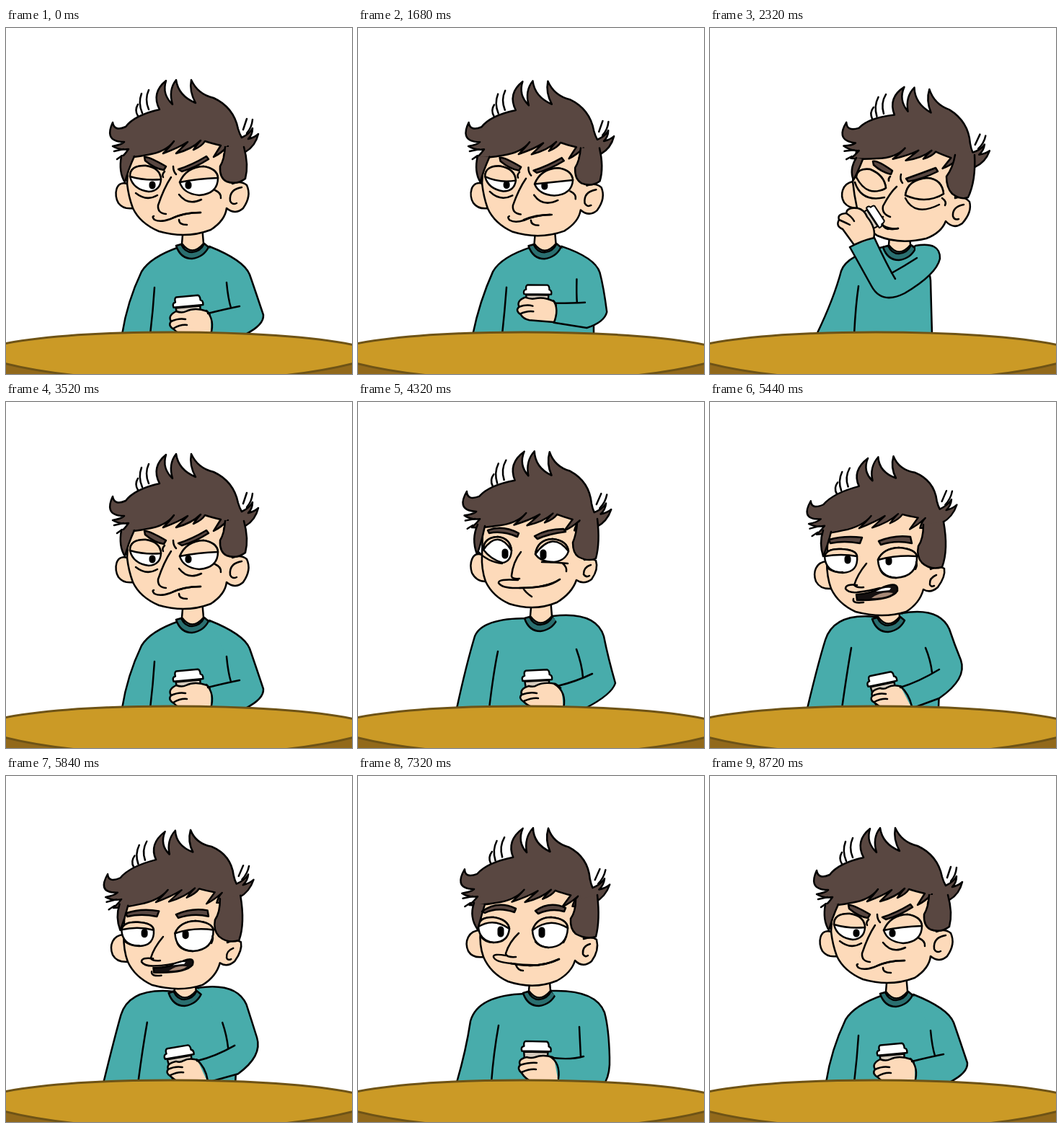
Animation, 480 px wide and 480 px high, one loop 8760 ms. Source, as an HTML page:

```html
<!DOCTYPE html>
<html lang="en">
<head>
<meta charset="utf-8">
<title>Coffee break</title>
<style>
html, body { margin: 0; height: 100%; overflow: hidden; background: #fff; }
svg { display: block; width: 100%; height: 100%; }
path { fill: none; stroke: #000; stroke-width: 2.5; stroke-linecap: round; stroke-linejoin: round; }
.skin { fill: #fddaba; }
.hair { fill: #594741; }
.shirt { fill: #48acab; }
.collar { fill: #2a6f70; }
.white { fill: #fff; }
.paper { fill: #d6cbbd; }
.dark { fill: #141010; }
.tongue { fill: #a88a78; }
.rim { fill: #92691b; }
.table { fill: #cb9a26; stroke: #6e5316; stroke-width: 3; }
.plain { stroke: none; }
.pupil { stroke-width: 9; }
</style>
</head>
<body>
<svg viewBox="0 0 480 480">
  <path id="body" class="shirt"/>
  <path id="sleeve"/>
  <g id="neck">
    <path class="skin" d="M246 275L244 299Q258 318 274 299L272 275"/>
    <path class="collar" d="M236 302Q242 320 258 320Q274 318 281 304L275 299Q270 310 258 311Q248 311 243 300Z"/>
  </g>
  <path id="head" class="skin"/>
  <path id="faceLines"/>
  <path id="eyeL" class="white"/>
  <path id="eyeR" class="white"/>
  <path id="pupils" class="pupil"/>
  <path id="coverL" class="skin"/>
  <path id="coverR" class="skin"/>
  <path id="bags"/>
  <path id="nose"/>
  <path id="open" class="dark"/>
  <path id="teeth" class="white plain"/>
  <path id="tongue" class="tongue plain"/>
  <path id="mouth"/>
  <path id="frown"/>
  <g id="hair"><g transform="translate(-248.5 -139.5)">
    <path class="hair" d="M148 131Q150 144 166 137Q178 121 213 113Q201 90 222 73Q216 92 231 106Q225 86 236 72Q239 94 263 104Q254 88 257 72Q266 92 288 97Q316 110 322 140Q324 147 327 152Q338 147 342 139Q342 148 336 154Q345 152 350 147Q346 164 332 172L330 180L302 178Q303 170 308 164Q298 174 288 179Q296 166 298 163Q285 160 276 157Q272 164 260 169Q266 160 270 156Q258 168 236 174Q246 164 252 158Q240 166 218 174Q228 164 233 157Q222 172 196 176Q176 180 160 180Q166 174 170 168Q158 170 148 164Q160 162 164 158C140 158 142 144 148 131Z"/>
    <path d="M183 122Q178 114 183 106M189 118Q183 104 188 91M198 113Q192 99 198 86M329 141L334 126M334 146Q341 138 342 127M163 168L150 171M161 177L154 182"/>
  </g></g>
  <path id="sideL" class="hair"/>
  <path id="sideR" class="hair"/>
  <path id="browL" class="hair"/>
  <path id="browR" class="hair"/>
  <g id="cup">
    <path class="paper" d="M-17 6L-14 40H14L17 6Z"/>
    <path class="white" d="M-15 -9H15Q18 -8 18 -2Q22 -1 21 5H-20Q-22 -1 -17 -2Q-18 -8 -15 -9Z"/>
  </g>
  <path id="hand" class="skin"/>
  <path id="fingers"/>
  <path id="armFill" class="shirt plain"/>
  <path id="arm"/>
  <path id="folds"/>
  <path class="rim plain" d="M-2 445H482V482H-2Z"/>
  <path class="table" d="M-3 438C60 426 140 422 230 422C330 422 430 428 483 440V465Q440 476 385 482H98Q40 476 -3 465Z"/>
</svg>
<script>
// Every pose uses the same path structure, so any two can be blended number by number.
const noTeeth = 'M238 259Q238 259 238 259L238 259Q238 259 238 259Z';
const noTongue = 'M236 260Q236 260 236 260Q236 260 236 260Z';
const noFrown = 'M252 187Q252 187 252 187M218 186Q218 186 218 186';

function pose(p) {
  p = { teeth: noTeeth, tongue: noTongue, frown: noFrown, ...p };
  p.eyeL = p.topL + p.lowL;
  p.eyeR = p.topR + p.lowR;
  p.coverL = p.topL + p.lidL;
  p.coverR = p.topR + p.lidR;
  p.armFill = p.arm + p.bend + 'Z';
  return p;
}

const grumpy = pose({
  body: 'M161 425Q168 380 188 338Q200 318 240 304L280 303Q325 325 330 360L330 425',
  sleeve: 'M206 360Q204 392 200 425',
  neck: 'translate(0 0)',
  head: 'M172 150L168 216C152 211 149 232 156 243Q163 252 176 250Q186 271 212 282Q250 293 284 280Q304 267 306 250Q318 260 329 250Q341 233 334 218Q326 211 314 216L318 150Z',
  faceLines: 'M168 216Q170 234 176 250M327 221Q309 224 311 240Q314 246 320 243',
  topL: 'M172 206Q172 190 194 191Q214 194 215 210',
  lowL: 'Q214 226 198 227Q176 224 172 206Z',
  lidL: 'Q192 212 172 206Z',
  topR: 'M241 214Q250 193 274 192Q293 195 294 208',
  lowR: 'Q294 230 268 232Q246 230 241 214Z',
  lidR: 'Q266 209 241 214Z',
  pupils: 'M203 217L203 219M253 217L253 219',
  bags: 'M180 229Q195 241 210 232M240 231Q252 247 271 238M290 225Q299 229 298 236',
  nose: 'M229 207Q219 222 211 246Q210 257 222 258',
  open: 'M228 265Q246 256 270 256Q262 256 254 257Q240 259 228 265Z',
  mouth: 'M205 261Q202 262 206 266Q214 270 228 265Q246 256 270 256M240 266Q240 273 251 273',
  frown: 'M232 192Q232 199 236 203M220 199Q216 203 218 207',
  hair: 'matrix(1 0 0 1 248.5 139.5)',
  sideL: 'M160 178Q156 200 165 214Q169 198 178 178',
  sideR: 'M304 165Q303 182 297 192Q296 208 306 213Q320 218 332 209Q337 190 330 165',
  browL: 'M192 179Q198 178 222 192L219 197Q206 195 193 184Z',
  browR: 'M239 196Q258 190 278 178L281 182Q262 194 244 199Z',
  cup: 'matrix(.995 -.09 .09 .995 252 381)',
  hand: 'M236 393Q224 399 229 407Q224 413 233 418Q238 424 246 425L286 425Q290 404 279 393Q262 387 250 393Q244 396 236 393Z',
  fingers: 'M229 407Q240 402 249 404M232 417Q242 411 251 412',
  arm: 'M282 303Q330 322 338 342Q345 362 357 398Q358 412 332 425L284 425',
  bend: 'L284 397L324 387L306 353',
  folds: 'M306 353Q308 375 312 388M324 386Q304 390 280 396M278 392Q290 405 284 425'
});

const drink = pose({
  body: 'M148 425Q172 375 182 337Q190 314 244 303L285 303Q304 330 306 350L308 425',
  sleeve: 'M206 358Q202 385 200 425',
  neck: 'translate(4 2)',
  head: 'M205 155L198 213C183 216 180 232 186 242Q192 250 204 250Q212 275 232 288Q262 301 300 292Q321 284 327 268Q338 280 350 271Q364 255 360 241Q352 232 340 236L350 165Z',
  faceLines: 'M198 213Q200 232 204 250M352 245Q336 248 337 261Q339 267 345 265',
  topL: 'M203 207Q204 194 222 196Q242 204 244 222',
  lowL: 'Q236 228 224 224Q210 218 203 207Z',
  lidL: 'Q218 236 203 207Z',
  topR: 'M271 232Q274 210 302 208Q322 210 324 230',
  lowR: 'Q316 236 300 236Q280 236 271 232Z',
  lidR: 'Q300 245 271 232Z',
  pupils: 'M226 214L226 216M296 224L296 226',
  bags: 'M201 214Q210 242 242 235M271 236Q284 262 318 245M322 236Q329 241 326 246',
  nose: 'M259 220Q250 228 240 247Q238 258 250 262',
  open: 'M240 274Q243 278 246 278Q252 280 261 278Q252 280 240 274Z',
  mouth: 'M240 262Q236 262 238 270Q240 276 246 278Q252 280 261 278M239 272Q242 278 247 279',
  frown: 'M265 203Q263 210 267 215M250 206Q247 209 248 212',
  hair: 'matrix(.993 .117 -.117 .993 288 151)',
  sideL: 'M203 180Q193 196 199 211Q205 200 212 182',
  sideR: 'M340 176Q337 194 328 206Q328 222 336 230Q348 239 358 235Q369 212 367 176',
  browL: 'M226 185Q232 183 253 198L251 203Q238 200 227 190Z',
  browR: 'M272 209Q292 202 313 194L316 199Q296 209 275 213Z',
  cup: 'matrix(.44 .67 -.67 .44 229 261)',
  hand: 'M205 250Q190 248 189 257Q176 258 179 266Q174 275 184 279L200 301Q216 302 227 292Q231 278 218 262Q214 252 205 250Z',
  fingers: 'M189 257Q197 262 200 268M179 266Q188 270 194 273',
  arm: 'M285 302Q320 296 319 320Q314 342 270 368Q238 384 224 358L194 304',
  bend: 'L228 291L252 338L285 320',
  folds: 'M287 319Q270 330 252 340M257 348Q246 330 228 291M228 291Q210 295 194 304'
});

const smile = pose({
  body: 'M137 425Q150 365 162 325Q172 300 235 300L270 297Q320 320 330 350L320 425',
  sleeve: 'M194 346Q188 375 182 425',
  neck: 'translate(-5 -2)',
  head: 'M174 150L172 212C158 207 154 224 158 237Q164 249 177 249Q187 270 210 280Q245 291 276 278Q297 265 303 247Q313 254 324 246Q334 232 330 220Q324 216 314 219L318 150Z',
  faceLines: 'M172 212Q171 232 177 249M323 226Q313 229 313 239Q316 244 321 241',
  topL: 'M174 205Q174 188 194 187Q211 189 213 206',
  lowL: 'Q212 222 200 223Q184 218 174 205Z',
  lidL: 'Q194 176 174 205Z',
  topR: 'M246 211Q249 191 270 190Q290 192 292 207',
  lowR: 'Q288 220 272 222Q253 222 246 211Z',
  lidR: 'Q270 178 246 211Z',
  pupils: 'M204 208L204 213M257 209L257 214',
  bags: 'M166 207Q180 222 200 224M255 222Q272 222 291 224M284 224Q290 229 289 235',
  nose: 'M226 208Q215 222 213 241Q213 246 224 245',
  open: 'M224 258Q262 258 280 246Q270 253 260 255Q244 258 224 258Z',
  mouth: 'M222 247Q194 245 195 251Q200 259 224 258Q262 258 280 246M229 258Q232 264 241 270',
  hair: 'matrix(1 .044 -.1 1.01 250.5 137)',
  sideL: 'M166 170Q157 190 165 211Q170 200 176 172',
  sideR: 'M304 168Q303 183 298 195Q298 210 306 215Q320 222 330 217Q336 195 332 162',
  browL: 'M180 178Q200 170 223 182L221 187Q200 178 182 182Z',
  browR: 'M245 186Q262 176 285 176L288 180Q264 183 249 190Z',
  cup: 'matrix(.99 -.05 .05 .99 248 381)',
  hand: 'M237 394Q224 398 227 406Q222 411 230 416Q236 422 246 425L287 425Q292 402 274 391Q258 388 248 393Q244 396 237 394Z',
  fingers: 'M227 406Q238 402 248 404M230 415Q242 410 250 411',
  arm: 'M270 297Q330 290 341 325Q347 355 357 390Q352 406 315 425L285 425',
  bend: 'L282 397L320 380L303 343',
  folds: 'M303 343Q311 365 312 382M325 377Q302 388 277 394M272 391Q290 402 285 425'
});

const talk = pose({
  body: 'M135 425Q150 362 160 330Q172 292 230 298L266 293Q315 320 320 350L317 425',
  sleeve: 'M196 341Q190 375 183 425',
  neck: 'translate(-11 -1)',
  head: 'M165 155L162 221C147 222 142 236 147 249Q153 260 168 259Q178 280 202 291Q240 301 272 291Q291 279 296 260Q306 266 316 257Q327 242 325 231Q317 226 306 232L306 150Z',
  faceLines: 'M162 221Q162 243 168 259M314 240Q304 244 305 253Q306 257 311 255',
  topL: 'M159 214Q162 203 182 204Q203 205 204 214',
  lowL: 'Q206 236 184 237Q160 236 159 214Z',
  lidL: 'Q182 210 159 214Z',
  topR: 'M233 219Q240 203 262 202Q285 204 287 214',
  lowR: 'Q288 242 258 244Q234 242 233 219Z',
  lidR: 'Q260 212 233 219Z',
  pupils: 'M191 217L191 220M248 219L248 222',
  bags: 'M164 231Q172 237 184 236M236 232Q240 243 258 244M286 222Q288 226 285 232',
  nose: 'M217 224Q204 240 200 254Q203 258 213 257',
  open: 'M203 267Q222 266 240 257Q262 248 260 262Q252 276 204 275Z',
  teeth: 'M230 263Q240 257 251 258L249 261Q240 262 230 263Z',
  tongue: 'M224 272Q238 262 254 265Q246 272 224 272Z',
  mouth: 'M204 254Q188 252 188 259Q192 265 204 264Q222 262 236 258M199 273Q197 280 213 278',
  hair: 'matrix(1.01 -.05 -.08 .96 240.5 140.5)',
  sideL: 'M157 178Q151 196 157 214Q163 200 168 180',
  sideR: 'M296 170Q296 190 289 200Q286 214 294 223Q306 234 322 229Q331 205 324 166',
  browL: 'M165 191Q186 185 211 188L208 196Q186 192 167 196Z',
  browR: 'M234 193Q256 184 278 187L280 196Q258 191 237 198Z',
  frown: 'M245 191Q245 191 245 191M200 191Q200 191 200 191',
  cup: 'matrix(.97 -.2 .2 .97 238 386)',
  hand: 'M236 397Q222 400 225 408Q221 413 228 417Q234 422 240 425L282 425Q280 404 266 395Q254 391 246 396Q242 399 236 397Z',
  fingers: 'M225 408Q234 403 244 405M228 416Q238 411 246 412',
  arm: 'M266 293Q318 284 332 315Q339 336 348 358Q357 384 318 411L280 425',
  bend: 'L265 396L318 371L299 341',
  folds: 'M299 341Q306 358 308 375M318 371Q290 388 264 396M264 394Q276 405 280 422'
});

const calm = pose({
  body: 'M137 425Q150 380 156 340Q166 304 232 302L268 298Q320 320 330 350L325 425',
  sleeve: 'M195 346Q188 385 185 425',
  neck: 'translate(-7 -1)',
  head: 'M172 150L170 214C153 214 147 230 153 243Q159 253 174 251Q184 274 208 285Q244 297 276 284Q296 273 301 256Q312 267 324 257Q335 242 331 227Q325 222 313 226L318 150Z',
  faceLines: 'M170 214Q168 234 174 251M322 233Q311 236 312 247Q315 252 319 249',
  topL: 'M167 209Q168 195 188 196Q208 199 210 212',
  lowL: 'Q208 231 188 231Q168 228 167 209Z',
  lidL: 'Q188 196 167 209Z',
  topR: 'M242 214Q248 196 268 196Q290 198 291 211',
  lowR: 'Q290 237 264 238Q243 236 242 214Z',
  lidR: 'Q266 195 242 214Z',
  pupils: 'M198 213L198 219M255 214L255 220',
  bags: 'M170 222Q176 231 188 231M246 230Q252 237 264 238M289 222Q288 226 285 231',
  nose: 'M223 218Q210 230 205 246Q205 252 219 251',
  open: 'M212 260Q250 268 279 254Q266 260 252 262Q236 263 212 260Z',
  mouth: 'M205 249Q187 246 188 251Q190 258 212 260Q250 268 279 254M219 262Q222 270 229 270',
  hair: 'matrix(1.005 .026 -.11 1.01 248 140.5)',
  sideL: 'M161 176Q154 196 166 213Q170 198 176 178',
  sideR: 'M302 172Q302 188 295 198Q294 212 302 219Q316 227 330 223Q336 200 332 165',
  browL: 'M172 188Q194 172 219 184L217 189Q194 181 176 190Z',
  browR: 'M246 187Q266 173 288 183L286 188Q268 183 250 191Z',
  cup: 'matrix(.98 .02 -.02 .98 247 377)',
  hand: 'M234 390Q221 393 225 401Q220 406 227 412Q232 420 242 425L280 425Q284 398 270 390Q256 386 246 390Q240 392 234 390Z',
  fingers: 'M225 401Q238 397 248 398M227 411Q238 406 247 407',
  arm: 'M268 298Q330 296 342 328Q348 350 349 390Q350 412 343 425L278 425',
  bend: 'L272 392L312 390L307 348',
  folds: 'M307 348Q308 370 309 390M313 389Q295 394 270 391M266 389Q281 398 278 420'
});

const hush = pose({
  ...talk, teeth: noTeeth, tongue: noTongue,
  open: 'M203 267Q222 266 240 260Q250 256 256 257Q240 268 204 268Z'
});
const blink = pose({ ...calm, lidL: 'Q188 250 167 209Z', lidR: 'Q266 262 242 214Z' });

const LOOP = 8760;
const keys = [
  [0, grumpy], [1560, grumpy], [2080, drink], [2580, drink], [3080, grumpy],
  [3560, grumpy], [3920, smile], [4400, smile], [4640, talk], [4760, hush],
  [4880, talk], [5000, hush], [5200, smile], [5400, talk], [5520, talk],
  [5640, hush], [5760, talk], [6080, calm], [6400, calm], [6480, blink],
  [6560, blink], [6640, calm], [7400, calm], [7760, grumpy], [LOOP, grumpy]
];

const number = /-?\d*\.?\d+/g;
function mix(a, b, k) {
  if (a === b || !k) return a;
  const ends = b.match(number);
  let i = 0;
  return a.replace(number, n => +(+n + (ends[i++] - n) * k).toFixed(3));
}

const parts = Object.keys(grumpy)
  .map(name => [name, document.getElementById(name)])
  .filter(([, el]) => el);

function draw(now) {
  const t = Math.floor(now % LOOP / 40) * 40;
  const i = keys.findIndex(([end]) => end > t);
  const [t0, a] = keys[i - 1], [t1, b] = keys[i];
  const u = (t - t0) / (t1 - t0), k = u * u * (3 - 2 * u);
  for (const [name, el] of parts)
    el.setAttribute(el.tagName === 'g' ? 'transform' : 'd', mix(a[name], b[name], k));
}

function tick() {
  draw(performance.now());
  requestAnimationFrame(tick);
}
tick();
</script>
</body>
</html>
```
